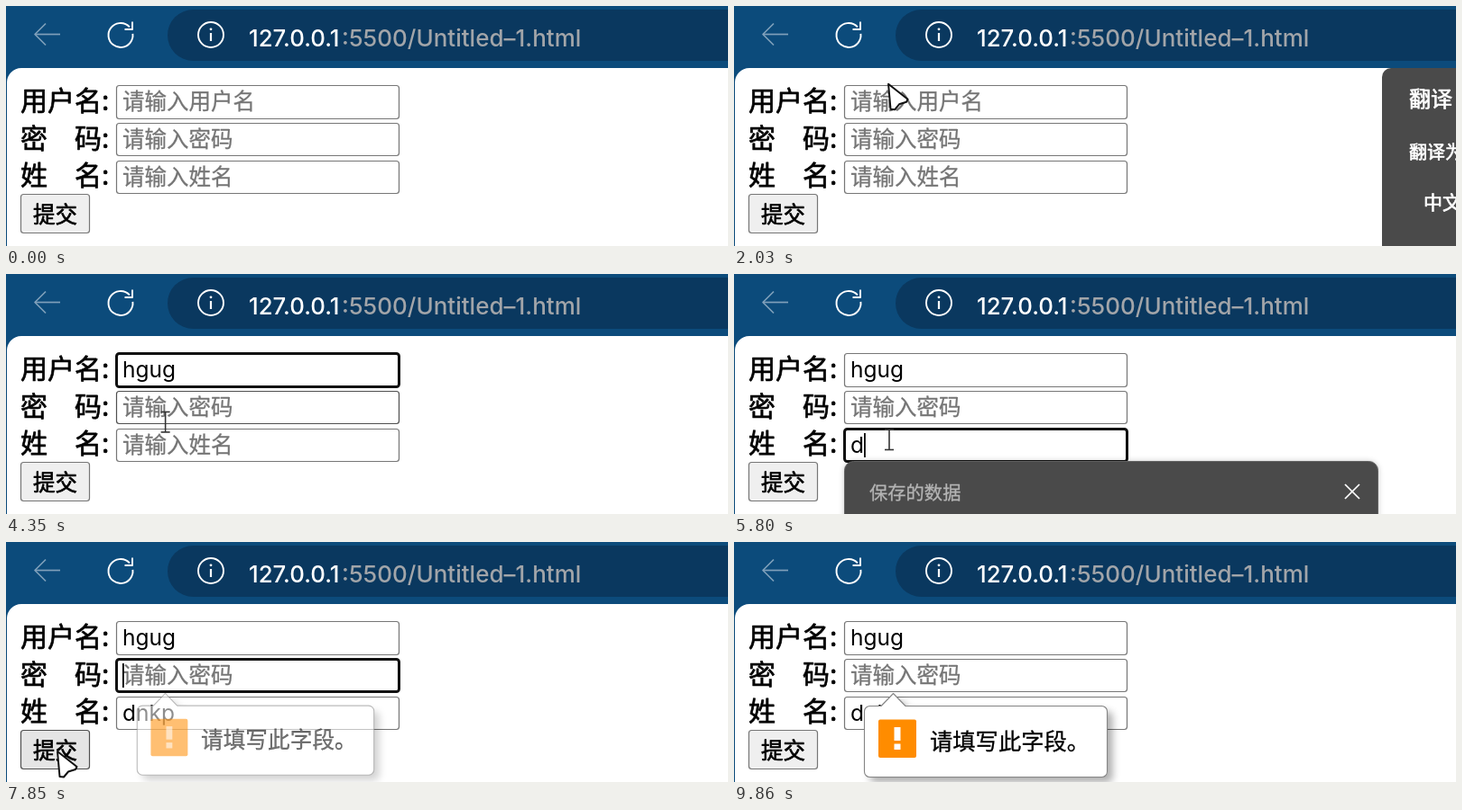
Write an HTML page with a canvas that moves like this. It is 800 px wide and 267 px high and loops after 10 s.

```html
<!DOCTYPE html>
<html lang="zh">
<head>
<meta charset="utf-8">
<title>表单校验</title>
<style>
html, body { margin: 0; width: 100%; height: 100%; overflow: hidden; background: #fff; }
canvas { display: block; width: 800px; height: 267px; }
</style>
</head>
<body>
<canvas id="stage"></canvas>
<script>
const W = 800, H = 267, LOOP = 10000, BLINK = 530;
const canvas = document.getElementById('stage');
const ctx = canvas.getContext('2d');
const ratio = window.devicePixelRatio || 1;
canvas.width = W * ratio;
canvas.height = H * ratio;

const CJK = '"Noto Sans CJK SC", "Noto Sans CJK", sans-serif';
const LATIN = 'Inter, Roboto, sans-serif';
const ROWS = [
  { label: '用户名:', hint: '请输入用户名', y: 88, h: 38, value: 'hgug', keys: [2960, 3080, 3200, 3330] },
  { label: '密　码:', hint: '请输入密码', y: 130, h: 37, value: '', keys: [] },
  { label: '姓　名:', hint: '请输入姓名', y: 172, h: 37, value: 'dnkp', keys: [5800, 5950, 6130, 6310] }
];
// Focus periods: row, start, end
const FOCUS = [[1, 300, 1600], [0, 2400, 5410], [2, 5410, 7380], [1, 7710, 9820]];
// Pointer moves: start, end, from, to
const MOVES = [
  [280, 950, [350, 270], [123, 33]],
  [1700, 2210, [123, 33], [190, 108]],
  [3890, 4580, [190, 108], [172, 184]],
  [6840, 7210, [172, 184], [57, 233]],
  [8050, 8700, [57, 233], [560, 272]]
];

const clamp = v => Math.max(0, Math.min(1, v));
const ramp = (t, a, b) => clamp((t - a) / (b - a));
const ease = p => p * p * (3 - 2 * p);
const within = (t, a, b) => t >= a && t < b;

function box(x, y, w, h, r, fill, stroke, width = 1) {
  ctx.beginPath();
  ctx.roundRect(x, y, w, h, r);
  if (fill) { ctx.fillStyle = fill; ctx.fill(); }
  if (stroke) { ctx.strokeStyle = stroke; ctx.lineWidth = width; ctx.stroke(); }
}

function line(points, color, width) {
  ctx.beginPath();
  points.forEach(([x, y]) => ctx.lineTo(x, y));
  ctx.strokeStyle = color;
  ctx.lineWidth = width;
  ctx.stroke();
}

function latin(str, x, y, size, color, weight = 400) {
  ctx.font = `${weight} ${size}px ${LATIN}`;
  ctx.fillStyle = color;
  ctx.fillText(str, x, y);
}

// A thin outline gives the strokes their in-between weight.
function han(str, x, y, size, color, heft = 0.3) {
  ctx.font = `${size}px ${CJK}`;
  ctx.fillStyle = ctx.strokeStyle = color;
  ctx.lineWidth = heft;
  ctx.fillText(str, x, y);
  ctx.strokeText(str, x, y);
}

function ring(x, y, r, from, to) {
  ctx.beginPath();
  ctx.arc(x, y, r, from, to);
  ctx.strokeStyle = '#fff';
  ctx.lineWidth = 1.9;
  ctx.stroke();
}

function drawToolbar(t) {
  ctx.fillStyle = '#0c4b7b';
  ctx.fillRect(0, 0, W, H);
  box(179, 4, 700, 57, 28.5, '#0a385f');
  if (within(t, 880, 1800)) box(90, 4, 74, 57, 5, '#235b87');

  line([[60, 31.5], [32, 31.5]], '#7f9fba', 1.7);
  line([[44, 19.5], [32, 31.5], [44, 43.5]], '#7f9fba', 1.7);

  ring(127, 32.5, 13.5, -0.12, Math.PI * 2 - 0.75);
  line([[140, 17.5], [140, 26], [131.5, 26]], '#fff', 1.9);

  ring(227, 32, 14, 0, Math.PI * 2);
  line([[227, 30], [227, 39]], '#fff', 2.2);
  box(225.6, 24.4, 2.8, 2.8, 1.4, '#fff');

  latin('127.0.0.1', 269, 45, 25.8, '#fff', 500);
  latin(':5500/Untitled–1.html', 372, 45, 26, '#a2a5a9', 450);
}

function drawRow(row, i, t, focus, pointer) {
  const { y, h } = row;
  const base = y + 27;
  han(row.label, 16, 116 + i * 41.5, 30, '#000', 0.7);

  const hover = pointer[0] > 122 && pointer[0] < 436 && pointer[1] > y && pointer[1] < y + h;
  const active = focus && focus[0] === i;
  if (active) box(122.5, y + 0.5, 313, h - 1, 3, '#fff', '#101010', 3);
  else box(122.5, y + 0.5, 313, h - 1, 3, '#fff', hover ? '#4f4f4f' : '#767676', 1.2);

  const typed = row.value.slice(0, row.keys.filter(k => t >= k).length);
  if (typed) latin(typed, 129, base, 24.5, '#000');
  else han(row.hint, 129, base, 24.5, '#757575');

  if (!active) return;
  const start = Math.max(focus[1], ...row.keys.filter(k => t >= k));
  if (Math.floor((t - start) / BLINK) % 2) return;
  const x = 129 + (typed ? ctx.measureText(typed).width : 0);
  ctx.fillStyle = '#000';
  ctx.fillRect(x, y + 5, 1.8, 27);
}

function drawButton(t) {
  const hover = within(t, 7080, 8140);
  const pressed = within(t, 7400, 7710);
  box(16.5, 209.5, 76, 43, 3, pressed ? '#f5f5f5' : hover ? '#e5e5e5' : '#efefef',
    hover ? '#4f4f4f' : '#767676', 1.2);
  han('提交', 30, 240.7, 24.5, '#000', 0.7);
}

function drawTranslate(t) {
  const alpha = ramp(t, 1470, 1700) * (1 - ramp(t, 2400, 2580));
  if (!alpha) return;
  ctx.save();
  ctx.globalAlpha = alpha;
  box(718, 69, 120, 240, [10, 0, 0, 0], '#4a4a4a');
  han('翻译', 748, 112, 24, '#fff', 0.7);
  han('翻译为', 748, 170, 20, '#fff', 0.7);
  han('中文', 764, 226, 21, '#fff', 0.7);
  ctx.restore();
}

function drawSaved(t) {
  const alpha = ramp(t, 5390, 5460) * (1 - ramp(t, 5950, 6200));
  if (!alpha || t < 5410) return;
  ctx.save();
  ctx.globalAlpha = alpha;
  ctx.shadowColor = 'rgba(0,0,0,.25)';
  ctx.shadowBlur = 6 * ratio;
  box(122.5, 208.5, 591, 100, 10, '#4a4a4a');
  ctx.shadowColor = 'transparent';
  box(122.5, 208.5, 591, 100, 10, null, '#626262');
  han('保存的数据', 150, 251, 20.3, '#b4b4b4');
  line([[677, 234], [693, 250]], '#fff', 1.7);
  line([[693, 234], [677, 250]], '#fff', 1.7);
  ctx.restore();
}

function bubblePath() {
  const l = 144.5, r = 413.5, top = 182.5, bottom = 261.5, c = 6;
  const path = new Path2D();
  path.moveTo(l + c, top);
  path.lineTo(163, top);
  path.lineTo(176.5, 168.5);
  path.lineTo(190, top);
  path.arcTo(r, top, r, bottom, c);
  path.arcTo(r, bottom, l, bottom, c);
  path.arcTo(l, bottom, l, top, c);
  path.arcTo(l, top, r, top, c);
  path.closePath();
  return path;
}

function drawBubble(t) {
  const p = ramp(t, 7710, 7965);
  if (!p) return;
  const scale = 0.945 + 0.055 * p;
  const shape = bubblePath();
  ctx.save();
  ctx.globalAlpha = p;
  ctx.translate(177, 168);
  ctx.scale(scale, scale);
  ctx.translate(-177, -168);

  // Keep the shadow outside, so it does not tint the fading fill.
  ctx.save();
  const outside = new Path2D();
  outside.rect(-50, -50, W + 100, H + 100);
  outside.addPath(shape);
  ctx.clip(outside, 'evenodd');
  ctx.shadowColor = 'rgba(0,0,0,.32)';
  ctx.shadowBlur = 8 * ratio;
  ctx.shadowOffsetX = ctx.shadowOffsetY = 6 * ratio;
  ctx.fillStyle = '#fff';
  ctx.fill(shape);
  ctx.restore();

  ctx.fillStyle = '#fff';
  ctx.fill(shape);
  ctx.strokeStyle = '#858585';
  ctx.lineWidth = 1.1;
  ctx.stroke(shape);
  box(160, 197.5, 42, 42.5, 2, '#ff8c00');
  box(177.5, 206, 7, 15, 0, '#fff');
  box(177.5, 224.5, 7, 6.5, 0, '#fff');
  han('请填写此字段。', 217, 230.7, 25.3, '#000');
  ctx.restore();
}

function pointerAt(t) {
  let at = [-100, -100];
  for (const [start, end, a, b] of MOVES) {
    if (t < start) break;
    const p = ease(ramp(t, start, end));
    at = a.map((v, i) => v + (b[i] - v) * p);
  }
  return t > 8700 ? [-100, -100] : at;
}

function drawPointer([x, y]) {
  ctx.save();
  ctx.translate(x, y);
  const overField = x > 122 && x < 436 && ROWS.some(r => y > r.y && y < r.y + r.h);
  if (overField) {
    const bars = [[[-5, -11], [5, -11]], [[0, -11], [0, 11.5]], [[-5, 11.5], [5, 11.5]]];
    bars.forEach(b => line(b, '#333', 1.6));
  } else {
    ctx.beginPath();
    [[0, 0], [2.5, 28], [7, 28.5], [12, 22.5], [20, 20], [21.5, 17]]
      .forEach(([a, b]) => ctx.lineTo(a, b));
    ctx.closePath();
    ctx.lineJoin = 'round';
    ctx.fillStyle = '#fff';
    ctx.strokeStyle = '#111';
    ctx.lineWidth = 2;
    ctx.fill();
    ctx.stroke();
  }
  ctx.restore();
}

function draw(t) {
  ctx.setTransform(ratio, 0, 0, ratio, 0, 0);
  ctx.lineJoin = 'round';
  const pointer = pointerAt(t);
  const focus = FOCUS.find(f => within(t, f[1], f[2]));
  drawToolbar(t);
  box(1, 69, 820, 220, [16, 0, 0, 0], '#fff');
  ROWS.forEach((row, i) => drawRow(row, i, t, focus, pointer));
  drawButton(t);
  drawTranslate(t);
  drawSaved(t);
  drawBubble(t);
  drawPointer(pointer);
}

const begin = performance.now();
function tick() {
  draw((performance.now() - begin) % LOOP);
  requestAnimationFrame(tick);
}
tick();
</script>
</body>
</html>
```
